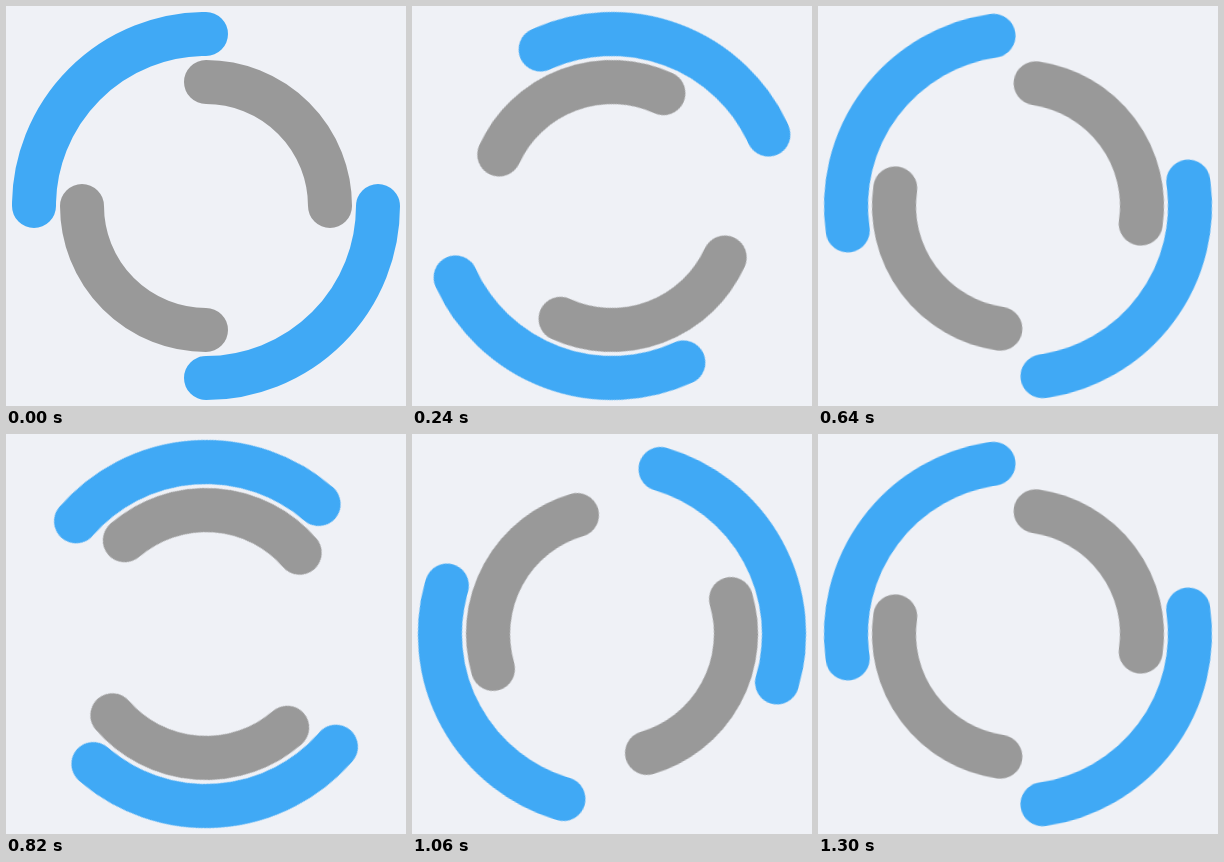
These frames come from a looping animation (400 px wide and 400 px high, 1.33 s). An HTML page:

```html
<!DOCTYPE html>
<html lang="en">
<head>
<meta charset="utf-8">
<title>Loading rings</title>
<style>
  html, body { margin: 0; width: 100%; height: 100%; overflow: hidden; background: #eff1f6; }
  svg { display: block; width: 100vw; height: 100vh; }
  path { fill: none; stroke-width: 44; stroke-linecap: round; }
  g { transform-origin: 0 0; }
  #outer { stroke: #40a9f5; }
  #inner { stroke: #999; }
</style>
</head>
<body>
<svg viewBox="-200 -200 400 400">
  <g id="outer"><path d="M-172 0A172 172 0 0 1 0 -172M172 0A172 172 0 0 1 0 172"/></g>
  <g id="inner"><path d="M0 -124A124 124 0 0 1 124 0M0 124A124 124 0 0 1 -124 0"/></g>
</svg>
<script>
  const LOOP = 1330, STEPS = 44;

  // [time in ms, step reached, steps until the next row]
  const rows = [[0, 0, 16], [480, 16, 1], [520, 17, 27], [LOOP, STEPS, 1]];

  function spin(id, dir) {
    const keys = rows.map(([ms, step, count]) => ({
      offset: ms / LOOP,
      transform: `rotate(${dir * step * 360 / STEPS}deg)`,
      easing: `steps(${count}, end)`
    }));
    // The small lead keeps step edges clear of rounding errors.
    document.getElementById(id).animate(keys, { duration: LOOP, iterations: Infinity, delay: -0.5 });
  }

  spin("outer", 1);
  spin("inner", -1);
</script>
</body>
</html>
```
